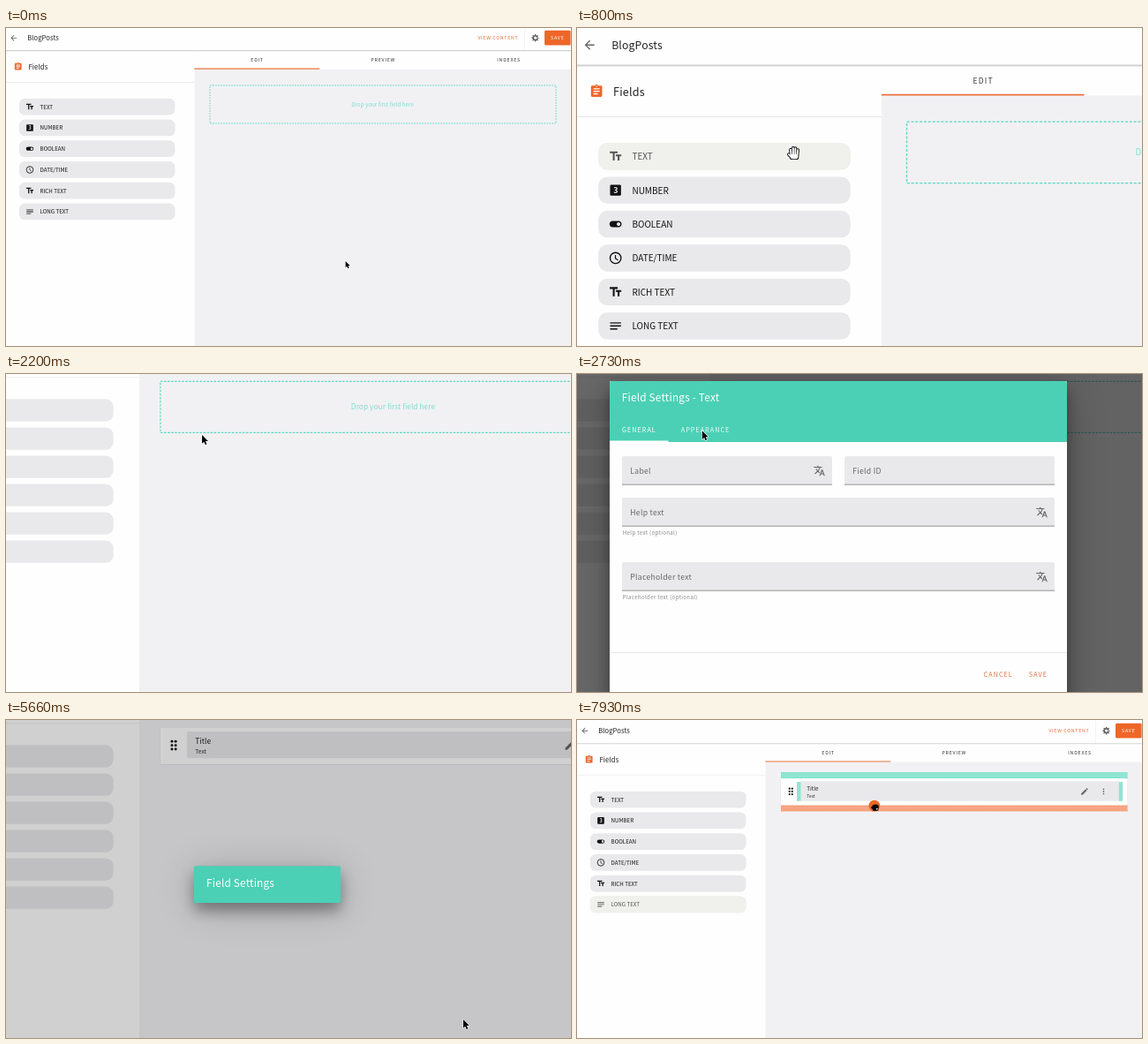
An HTML page with a canvas that plays this animation: 640 px wide and 360 px high, repeating every 8 s.

```html
<!DOCTYPE html>
<html lang="en">
<head>
<meta charset="utf-8">
<title>Field editor</title>
<style>
html, body { margin: 0; width: 100%; height: 100%; overflow: hidden; background: #fff; }
canvas { display: block; width: 640px; height: 360px; }
</style>
</head>
<body>
<canvas id="stage"></canvas>
<script>
const LOOP = 8000;
const FONT = '"Noto Sans CJK JP", "Noto Sans CJK SC", "Noto Sans CJK", "Open Sans", sans-serif';
const TEAL = '#4bd0b5', ORANGE = '#ee6629', GREY = '#e9e9eb', PAGE = '#f1f1f4', WHITE = '#fefefe';
const canvas = document.getElementById('stage');
const ctx = canvas.getContext('2d');
const dpr = window.devicePixelRatio || 1;
canvas.width = 640 * dpr;
canvas.height = 360 * dpr;

const ICON = {
  back: 'M20 11H7.83l5.59-5.59L12 4l-8 8 8 8 1.41-1.41L7.83 13H20v-2z',
  board: 'M19 3h-4.18C14.4 1.84 13.3 1 12 1c-1.3 0-2.4.84-2.82 2H5c-1.1 0-2 .9-2 2v14c0 1.1.9 2 2 2h14c1.1 0 2-.9 2-2V5c0-1.1-.9-2-2-2zm-7 0c.55 0 1 .45 1 1s-.45 1-1 1-1-.45-1-1 .45-1 1-1zm2 14H7v-2h7v2zm3-4H7v-2h10v2zm0-4H7V7h10v2z',
  text: 'M2.5 4v3h5v12h3V7h5V4h-13zm19 5h-9v3h3v7h3v-7h3V9z',
  toggle: 'M17 7H7c-2.76 0-5 2.24-5 5s2.24 5 5 5h10c2.76 0 5-2.24 5-5s-2.24-5-5-5zm0 8c-1.66 0-3-1.34-3-3s1.34-3 3-3 3 1.34 3 3-1.34 3-3 3z',
  notes: 'M3 18h12v-2H3v2zM3 6v2h18V6H3zm0 7h18v-2H3v2z',
  edit: 'M3 17.25V21h3.75L17.81 9.94l-3.75-3.75L3 17.25zM20.71 7.04c.39-.39.39-1.02 0-1.41l-2.34-2.34c-.39-.39-1.02-.39-1.41 0l-1.83 1.83 3.75 3.75 1.83-1.83z',
  translate: 'M12.87 15.07l-2.54-2.51.03-.03c1.74-1.94 2.98-4.17 3.71-6.53H17V4h-7V2H8v2H1v1.99h11.17C11.5 7.92 10.44 9.75 9 11.35 8.07 10.32 7.3 9.19 6.69 8h-2c.73 1.63 1.73 3.17 2.98 4.56l-5.09 5.02L4 19l5-5 3.11 3.11.76-2.04zM18.5 10h-2L12 22h2l1.12-3h4.75L21 22h2l-4.5-12zm-2.62 7l1.62-4.33L19.12 17h-3.24z'
};
for (const k in ICON) ICON[k] = new Path2D(ICON[k]);

const ITEMS = [['TEXT', 'text'], ['NUMBER', 'three'], ['BOOLEAN', 'toggle'],
  ['DATE/TIME', 'clock'], ['RICH TEXT', 'text'], ['LONG TEXT', 'notes']];

// Pointer route in page coordinates: time, x, y
const ROUTE = [
  [60, 384.6, 264], [790, 152.1, 87.4], [960, 152.1, 87.4], [1330, 280, 90.4], [1730, 300, 88],
  [1860, 300, 88], [2180, 266, 110], [2300, 266, 110], [2600, 248.9, 80.3], [2660, 248.9, 80.3],
  [2800, 165.8, 131.5], [3680, 165.8, 131.5], [3930, 485.5, 310.3], [6000, 485.5, 310.3],
  [6800, 149.5, 212.6], [7200, 149.5, 213.1], [7930, 338, 97.6]
];
const SHAPES = [[0, 'arrow'], [730, 'open'], [1000, 'grab'], [1800, 'arrow'], [2740, 'beam'],
  [3740, 'arrow'], [3900, 'point'], [5500, 'arrow'], [6840, 'open'], [7200, 'grab']];

const clamp = v => Math.min(1, Math.max(0, v));
const mix = (a, b, p) => a + (b - a) * p;
const ramp = (t, a, b) => clamp((t - a) / (b - a));
const ease = (t, a, b) => { const u = ramp(t, a, b); return u * u * (3 - 2 * u); };

function rect(x, y, w, h, color, r = 0) {
  ctx.fillStyle = color;
  ctx.beginPath();
  ctx.roundRect(x, y, w, h, r);
  ctx.fill();
}
function disc(x, y, r, color) {
  ctx.fillStyle = color;
  ctx.beginPath();
  ctx.arc(x, y, r, 0, 7);
  ctx.fill();
}
function line(points, color, width, dash = []) {
  ctx.strokeStyle = color;
  ctx.lineWidth = width;
  ctx.setLineDash(dash);
  ctx.beginPath();
  points.forEach(([x, y], i) => i ? ctx.lineTo(x, y) : ctx.moveTo(x, y));
  ctx.stroke();
  ctx.setLineDash([]);
}
function label(str, x, y, size, color, gap = 0, weight = 400) {
  ctx.font = `${weight} ${size}px ${FONT}`;
  ctx.letterSpacing = gap + 'px';
  ctx.fillStyle = color;
  ctx.fillText(str, x, y);
}
function icon(name, cx, cy, size, color) {
  ctx.save();
  ctx.translate(cx - size / 2, cy - size / 2);
  ctx.scale(size / 24, size / 24);
  if (name === 'three') {
    rect(3, 3, 18, 18, color, 2);
    label('3', 8.6, 17, 13, GREY, 0, 700);
  } else if (name === 'clock') {
    ctx.strokeStyle = color;
    ctx.lineWidth = 2;
    ctx.beginPath();
    ctx.arc(12, 12, 9, 0, 7);
    ctx.stroke();
    line([[11.8, 7], [11.8, 12.6], [16.2, 15.3]], color, 1.7);
  } else {
    ctx.fillStyle = color;
    ctx.fill(ICON[name]);
  }
  ctx.restore();
}
function gear(cx, cy, color) {
  ctx.fillStyle = color;
  ctx.beginPath();
  for (let i = 0; i < 32; i++) {
    const a = (i - 0.5) * Math.PI / 16, r = i % 4 < 2 ? 4.3 : 3.2;
    ctx.lineTo(cx + r * Math.cos(a), cy + r * Math.sin(a));
  }
  ctx.arc(cx, cy, 1.5, 7, 0, true);
  ctx.fill('evenodd');
}

function camera(t) {
  if (t >= 6000) {
    const p = ease(t, 6000, 6720);
    return { s: mix(1.348, 1, p), x: mix(-136.5, 0, p), y: mix(-79.2, 0.9, p) };
  }
  const zoom = ease(t, 60, 800), pan = ease(t, 1055, 1955);
  return {
    s: 1 + 0.617 * zoom - 0.269 * pan ** 1.8,
    x: -136.5 * pan,
    y: mix(zoom, -79.2, pan)
  };
}
function pointerAt(t) {
  let i = ROUTE.findIndex(k => k[0] > t);
  if (i === 0) i = 1;
  if (i < 0) i = ROUTE.length - 1;
  const a = ROUTE[i - 1], b = ROUTE[i], p = ease(t, a[0], b[0]);
  return [mix(a[1], b[1], p), mix(a[2], b[2], p)];
}

function sidebar(t) {
  rect(0, 25, 213.3, 400, WHITE);
  icon('board', 13.7, 43.7, 10.4, ORANGE);
  label('Fields', 25.4, 46.8, 7.8, '#222', 0.1, 500);
  rect(0, 61.3, 213.3, 0.6, '#e6e6e8');
  const hover = [ramp(t, 690, 800) * (t < 1800), 0, 0, 0, 0, ramp(t, 6650, 6800)];
  ITEMS.forEach(([name, glyph], i) => {
    const y = 89.2 + 23.75 * i;
    rect(14.9, y - 9.4, 176.6, 18.8, GREY, 6.4);
    if (hover[i]) {
      ctx.globalAlpha = hover[i];
      rect(14.9, y - 9.4, 176.6, 18.8, '#f0f0ec', 6.4);
      ctx.globalAlpha = 1;
    }
    const ink = hover[i] > 0.5 ? '#555' : '#111';
    icon(glyph, 27, y, 10.2, ink);
    label(name, 38.6, y + 2.4, 6.2, ink);
  });
}
function tabs() {
  rect(213.3, 25, 427, 21.7, WHITE);
  ['EDIT', 'PREVIEW', 'INDEXES'].forEach((name, i) =>
    label(name, [277.3, 413.5, 556.3][i], 38.4, 5.3, '#333', 0.75, 500));
  rect(213.3, 45.6, 142, 1.1, '#e8703c');
}
function topBar() {
  rect(0, 0, 640, 25.2, WHITE);
  rect(0, 25, 640, 0.9, '#cfcfd1');
  rect(0, 25.9, 640, 0.7, '#eeeef0');
  icon('back', 8.8, 11.3, 10.2, '#666');
  label('BlogPosts', 24.2, 14, 7.57, '#222', 0.1);
  label('VIEW CONTENT', 534.4, 13.4, 5.25, '#e8672f', 0.7, 500);
  rect(587, 0, 0.5, 25, '#ececee');
  gear(599.6, 11.2, '#666');
  rect(610, 2.8, 29.6, 16.8, ORANGE, 1.5);
  label('SAVE', 617, 13.3, 5.25, '#fff', 0.8, 500);
}
function dropZone() {
  line([[231, 65], [623, 65], [623, 108], [231, 108], [231, 65]], '#5bd8be', 0.85, [1.9, 1.1]);
  label('Drop your first field here', 391.2, 88.7, 6.2, '#7fdfca', 0.04);
}
function strip(y, h, fill, edge) {
  rect(231, y, 392.6, h, fill);
  for (const e of [y + 0.4, y + h - 0.4]) line([[231, e], [623.6, e]], edge, 0.8, [1.3, 0.9]);
}
function row(t, p) {
  rect(230.7, 64.8, 393, 31.6, '#e2e2e5', 1);
  rect(231, 65, 392.4, 30.8, WHITE, 1);
  rect(253.3, 68.4, 361, 22.4, GREY, 1);
  for (let i = 0; i < 6; i++) disc(240.7 + 3.1 * (i % 2), 76.8 + 3.2 * (i >> 1), 1.1, '#111');
  label('Title', 260.2, 78.9, 6.35, '#222');
  label('Text', 260.2, 87.3, 4.95, '#333');
  icon('edit', 575, 80, 10.2, '#666');
  for (let i = -1; i < 2; i++) disc(596.5, 80 + 2.6 * i, 0.85, '#666');
  if (t < 7260) return;
  const over = p[0] > 231 && p[1] < 108;
  strip(58.3, 6.8, '#8fe5d1', '#6cdcc3');
  strip(95.8, 6.6, over ? '#f7a684' : '#8fe5d1', over ? '#f08c62' : '#6cdcc3');
  rect(249, 69.2, 4.6, 21.6, '#8fe5d1');
  rect(613.8, 69.2, 4.4, 21.6, '#8fe5d1');
}

function field(x, y, w, name, value, focused, translated) {
  const up = value || focused;
  rect(x, y, w, 32.5, focused ? '#d5d5d4' : GREY, [2, 2, 0, 0]);
  rect(x, y + 31.7, w, 0.9, '#777');
  if (focused) rect(x, y + 31.6, Math.min(w, 152), 1, '#222');
  if (up) label(name, x + 9.3, y + 11.2, 6.25, '#444', 0.1);
  else label(name, x + 9.3, y + 19.5, 8.6, '#666', 0.3);
  label(value, x + 9.3, y + 23.4, 8.6, '#111', 0.3);
  if (translated) icon('translate', x + w - 14.5, y + 16.5, 13.8, '#666');
}
function sheet(x, y, w, h, color) {
  ctx.save();
  for (const [blur, drop, a] of [[46, 5, 0.2], [16, 9, 0.35]]) {
    ctx.shadowColor = `rgba(0,0,0,${a})`;
    ctx.shadowBlur = blur * dpr;
    ctx.shadowOffsetY = drop * dpr;
    rect(x, y, w, h, color, 2);
  }
  ctx.restore();
}
const typed = (t, a, b) => 'Title'.slice(0, Math.round(5 * ramp(t, a, b)));

function form(t) {
  sheet(37, 8, 518, 380, WHITE);
  rect(37, 8, 518, 69, TEAL, [2, 2, 0, 0]);
  label('Field Settings - Text', 50.8, 31, 11.8, '#fff', 0.2, 500);
  label('GENERAL', 51, 65.8, 7.2, '#fff', 1.05, 500);
  label('APPEARANCE', 117.8, 65.8, 7.2, '#f0fbf8', 1.05, 500);
  rect(37, 75.4, 66.4, 1.5, '#fff');

  const name = typed(t, 3200, 3400);
  field(51, 93, 238, 'Label', name, t > 2800 && t < 3430, true);
  field(303, 93, 238, 'Field ID', name.toLowerCase(), false, false);
  field(51, 140, 490, 'Help text', typed(t, 3430, 3560), t >= 3430 && t < 3600, true);
  field(51, 213, 490, 'Placeholder text', typed(t, 3600, 3730), t >= 3600 && t < 4200, true);
  label('Help text (optional)', 51.8, 182.4, 6.1, '#888', 0.35);
  label('Placeholder text (optional)', 51.8, 255.4, 6.1, '#888', 0.35);

  rect(37, 315, 518, 0.8, '#e3e3e4');
  label('CANCEL', 460.6, 343.3, 7.2, '#e0703c', 1.05, 500);
  const hover = ramp(t, 3850, 3960);
  if (hover) {
    ctx.globalAlpha = hover;
    rect(503, 330, 38, 21, '#fdf3ed', 2);
    const press = ramp(t, 4200, 4330) * (1 - ramp(t, 4330, 4460));
    ctx.globalAlpha = press * 0.5;
    rect(503, 330, 38, 21, '#f8cdb8', 2);
    ctx.globalAlpha = 1;
  }
  label('SAVE', 511.8, 343.3, 7.2, hover > 0.5 ? '#ee9468' : '#e0703c', 1.05, 500);
}
function dialog(t) {
  if (t < 2330 || t >= 5800) return;
  const open = ease(t, 2330, 2530);
  const shade = t < 5000 ? 0.59 * open : mix(0.59, 0.18, ramp(t, 5460, 5660));
  rect(0, 0, 640, 360, `rgba(0,0,0,${shade})`);
  if (t >= 5600) {
    sheet(213, 165.5, 166, 41.5, TEAL);
    label('Field Settings', 227, 189.3, 11.8, '#fff', 0.2, 500);
    return;
  }
  const k = mix(0.8, 1, open);
  ctx.save();
  ctx.globalAlpha = open;
  ctx.translate(296, 190);
  ctx.scale(k, k);
  ctx.translate(-296, -190);
  form(t);
  ctx.restore();
}

function arrow() {
  ctx.beginPath();
  for (const [x, y] of [[0, 0], [0, 7.2], [1.7, 5.7], [2.8, 8.2], [4, 7.6], [2.9, 5.2], [5.1, 5.1]]) ctx.lineTo(x, y);
  ctx.closePath();
  ctx.lineJoin = 'round';
  ctx.lineWidth = 0.9;
  ctx.strokeStyle = '#fff';
  ctx.stroke();
  ctx.fillStyle = '#000';
  ctx.fill();
}
function hand(kind) {
  const tops = { open: [-2.8, -4, -3.8, -2.6], grab: [-1.1, -1.9, -1.8, -1.2], point: [-3.6, -0.9, -0.7, -0.3] }[kind];
  const fill = kind === 'open' ? '#fff' : '#000';
  ctx.save();
  ctx.lineCap = 'round';
  for (const [color, pad] of [['#000', 0.55], [fill, 0]]) {
    tops.forEach((y, i) => {
      const x = -2.4 + 1.65 * i;
      line([[x, y], [x * 0.85, 1.5]], color, 1.2 + 2 * pad);
    });
    line([[-3.7, 0.5], [-1.8, 2.5]], color, 1.2 + 2 * pad);
    rect(-2.5 - pad, 0.4 - pad, 5.2 + 2 * pad, 3.2 + 2 * pad, color, 1.2);
  }
  if (kind === 'grab') rect(0.6, 1.4, 2.2, 1.7, '#e8e8e8', 0.8);
  if (kind === 'point') rect(-0.4, 2.2, 2, 1, '#bbb', 0.5);
  ctx.restore();
}
function pointer(t, [x, y]) {
  const shape = SHAPES.findLast(s => s[0] <= t)[1];
  if (t > 1050 && t < 1700) {
    ctx.globalAlpha = 0.07;
    disc(x - 57, y + 2.5, 6.3, ORANGE);
    ctx.globalAlpha = 1;
  }
  if (t >= 7260) disc(x - 1.2, y - 1.4, 6.4, ORANGE);
  ctx.save();
  ctx.translate(x, y);
  if (shape === 'arrow') arrow();
  else if (shape === 'beam') {
    line([[0, 0], [0, 7]], '#222', 0.7);
    for (const e of [0, 7]) line([[-1.4, e], [1.4, e]], '#222', 0.7);
  } else {
    if (shape === 'point') ctx.translate(0.8, 3.4);
    hand(shape);
  }
  ctx.restore();
}

function draw(t) {
  const cam = camera(t), p = pointerAt(t);
  const screen = () => ctx.setTransform(dpr, 0, 0, dpr, 0, 0);
  const page = () => ctx.setTransform(dpr * cam.s, 0, 0, dpr * cam.s, dpr * cam.x, dpr * cam.y);
  screen();
  rect(0, 0, 640, 360, WHITE);
  page();
  rect(213.3, 25, 430, 400, PAGE);
  sidebar(t);
  tabs();
  topBar();
  if (t < 5200) dropZone();
  else row(t, p);
  screen();
  dialog(t);
  page();
  pointer(t, p);
}

function tick(now) {
  draw(now % LOOP);
  requestAnimationFrame(tick);
}
requestAnimationFrame(tick);
</script>
</body>
</html>
```
